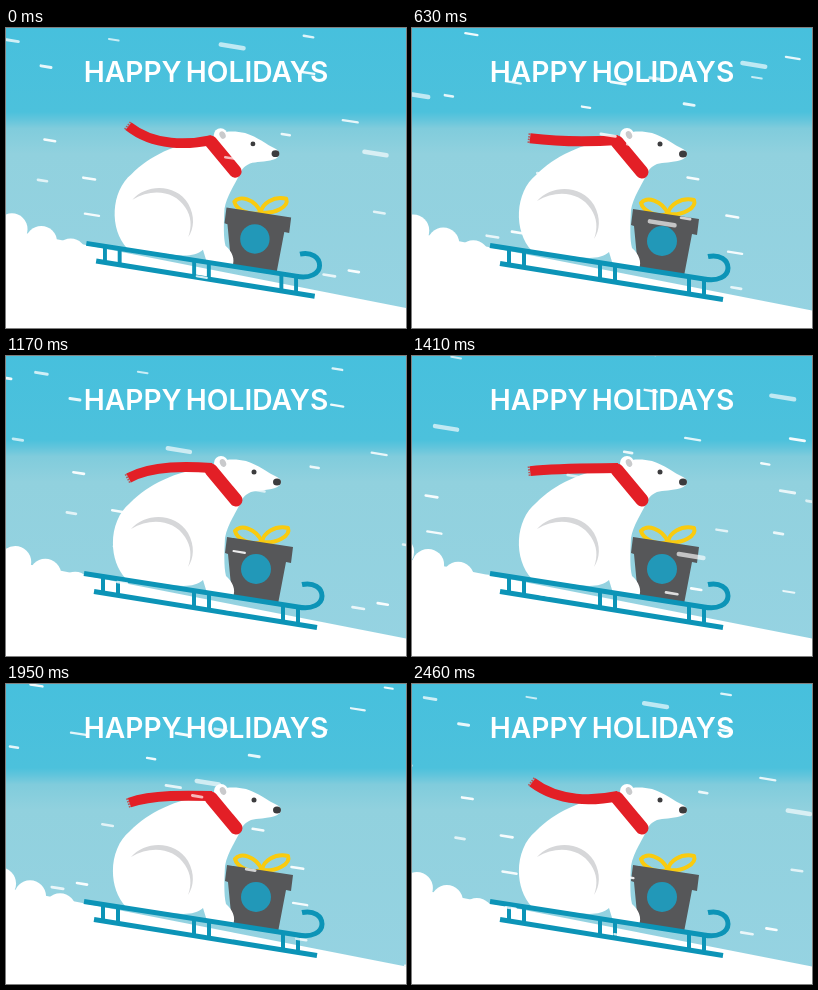
An HTML page for the animation above (2490 ms loop, 400x300 px).

```html
<!DOCTYPE html>
<html lang="en">
<head>
<meta charset="utf-8">
<title>Happy Holidays</title>
<style>
  html, body { margin: 0; width: 100%; height: 100%; overflow: hidden; }
  svg { display: block; width: 100vw; height: 100vh; }
  text { font: 600 28.2px Inter, Roboto, sans-serif; word-spacing: -3px; fill: #fff; text-anchor: middle; }
</style>
</head>
<body>
<svg viewBox="0 0 400 300">
  <defs>
    <linearGradient id="sky" x1="0" y1="0" x2="0" y2="1">
      <stop offset="0" stop-color="#47c0dd"/>
      <stop offset=".28" stop-color="#4cc1dc"/>
      <stop offset=".305" stop-color="#62c5dc"/>
      <stop offset=".335" stop-color="#80ccdc"/>
      <stop offset=".42" stop-color="#91d1de"/>
      <stop offset="1" stop-color="#96d3e2"/>
    </linearGradient>
    <filter id="soft" x="-10%" y="-10%" width="120%" height="120%">
      <feGaussianBlur stdDeviation=".6"/>
    </filter>
  </defs>

  <rect width="400" height="300" fill="url(#sky)"/>
  <text x="200" y="54">HAPPY HOLIDAYS</text>

  <g id="scene">
    <g fill="#fff">
      <path d="M-20 200L420 286.500V320H-20Z"/>
      <g id="puffs"></g>
    </g>

    <g id="gift">
      <g fill="none" stroke="#f9cb0f" stroke-width="4" stroke-linejoin="round">
        <path d="M256 186C245 190 231 183 229 175C234 168 250 172 256 186Z"/>
        <path d="M256 186C257 177 269 169 282 172C285 180 270 188 256 186Z"/>
      </g>
      <path fill="#565759" d="M221 181L287 191L285 207L280 206L272 248L226 240L222 198L219 197Z"/>
      <circle cx="250" cy="213" r="15" fill="#2298b8"/>
    </g>

    <g id="bear">
      <circle cx="215" cy="107" r="7" fill="#fff"/>
      <path fill="#fff" d="M120 223C101 203 103 164 124 147C143 128 168 116 205 110C212 103 228 102 240 105C253 109 262 117 271 121C277 124 276 130 269 132C260 135 251 134 245 136C238 139 236 143 234 148C229 158 221 170 219 182C218 200 218 212 220 220C227 226 230 234 227 241L201 237L197 224C190 230 180 231 165 229Z"/>
      <path fill="#d6d7d9" d="M125 173C140 156 170 157 182 177C189 190 188 202 182 211C186 200 185 190 179 181C168 164 145 161 125 173Z"/>
      <ellipse cx="217" cy="107" rx="3" ry="4" fill="#c9cacc" transform="rotate(-25 217 107)"/>
      <circle cx="248" cy="116" r="2.500" fill="#3c3c3e"/>
      <ellipse cx="271" cy="126" rx="4" ry="3.500" fill="#3c3c3e"/>
    </g>

    <g fill="none" stroke="#e31f26">
      <path id="tail" stroke-width="10"/>
      <path id="fringe" stroke="#b8565a" stroke-width="1.500" d="M0 -4H-2M0 -1.300H-2M0 1.300H-2M0 4H-2"/>
      <path stroke-width="13" stroke-linecap="round" d="M205 114L230 144"/>
    </g>

    <g fill="none" stroke="#0c94b7" stroke-width="5">
      <path id="posts" stroke-width="4"/>
      <path d="M78 217.500L292 251C306 254 316 248 316 240C316 232 308 226 296 228.500"/>
      <path d="M88 235.500L311 271.500"/>
    </g>
  </g>

  <g id="snow" fill="none" stroke="#fff" stroke-linecap="round" filter="url(#soft)"></g>
</svg>

<script>
const LOOP = 2490, STEP = 30, TAU = Math.PI * 2;
const SLOPE = 0.16, SPAN = 480, EDGE = 40, FLAKES = 34;
const PUFF_GAP = 30, PUFF_CYCLES = 8, PUFF_R = 16;
const JOLT_TIME = 120;

const $ = id => document.getElementById(id);
const set = (el, attrs) => {
  for (const name in attrs) el.setAttribute(name, attrs[name]);
};
const add = (parent, tag, attrs) => {
  const el = document.createElementNS("http://www.w3.org/2000/svg", tag);
  set(el, attrs);
  return parent.appendChild(el);
};

let seed = 11;
function random(min, max) {
  seed = (seed * 16807) % 2147483647;
  return min + (max - min) * seed / 2147483647;
}

// Each flake slides along its own sloping line
const flakes = Array.from({ length: FLAKES }, (_, i) => {
  const near = i % 9 === 4;
  const len = near ? random(18, 26) : random(8, 15);
  return {
    x: random(0, SPAN),
    base: (i + random(0, 1)) / FLAKES * 320 - 60,
    laps: near ? 3 : 2,
    el: add($("snow"), "path", {
      d: `M${-len / 2} ${-len * SLOPE / 2}l${len} ${len * SLOPE}`,
      "stroke-width": near ? 4.5 : random(2, 3),
      opacity: near ? 0.65 : random(0.65, 0.95)
    })
  };
});

const puffs = Array.from({ length: 4 }, () => add($("puffs"), "circle", { r: PUFF_R }));

// Three pairs of posts between the deck and the runner
let posts = "";
for (const x of [97, 188, 277])
  for (const dx of [0, 15]) posts += `M${x + dx} ${205 + (x + dx) * 0.157}v16`;
set($("posts"), { d: posts });

function drawScarf(t) {
  const a = t * 3 * TAU;
  const x = 121 + 3 * Math.sin(a);
  const lift = 13 * Math.cos(a), y = 111 - lift;
  const cx = 147, cy = 113.5 + lift * 0.4;
  const angle = Math.atan2(cy - y, cx - x) * 360 / TAU;
  set($("tail"), { d: `M206 112C182 ${113.5 + lift * 0.28} ${cx} ${cy} ${x} ${y}` });
  set($("fringe"), { transform: `translate(${x} ${y}) rotate(${angle})` });
}

function drawPuffs(t) {
  const shift = (t * PUFF_CYCLES) % 1;
  puffs.forEach((el, i) => {
    const cx = 2 + (i - shift) * PUFF_GAP;
    set(el, { cx, cy: 186 + PUFF_R + 0.43 * cx });
  });
}

function drawSnow(t) {
  for (const f of flakes) {
    const x = (f.x + SPAN * f.laps * (1 - t)) % SPAN - EDGE;
    set(f.el, { transform: `translate(${x} ${f.base + SLOPE * x})` });
  }
}

// The sled starts slightly drawn back and settles at once
function drawJolt(ms) {
  const k = Math.max(0, 1 - ms / JOLT_TIME);
  set($("scene"), { transform: `translate(195 110) scale(${1 - 0.02 * k * k}) translate(-195 -110)` });
}

function draw(now) {
  const ms = Math.floor((now % LOOP) / STEP) * STEP;
  const t = ms / LOOP;
  drawJolt(ms);
  drawScarf(t);
  drawPuffs(t);
  drawSnow(t);
}

let start;
function tick(now) {
  start ??= now;
  draw(Math.max(0, now - start));
  requestAnimationFrame(tick);
}
draw(0);
requestAnimationFrame(tick);
</script>
</body>
</html>
```
